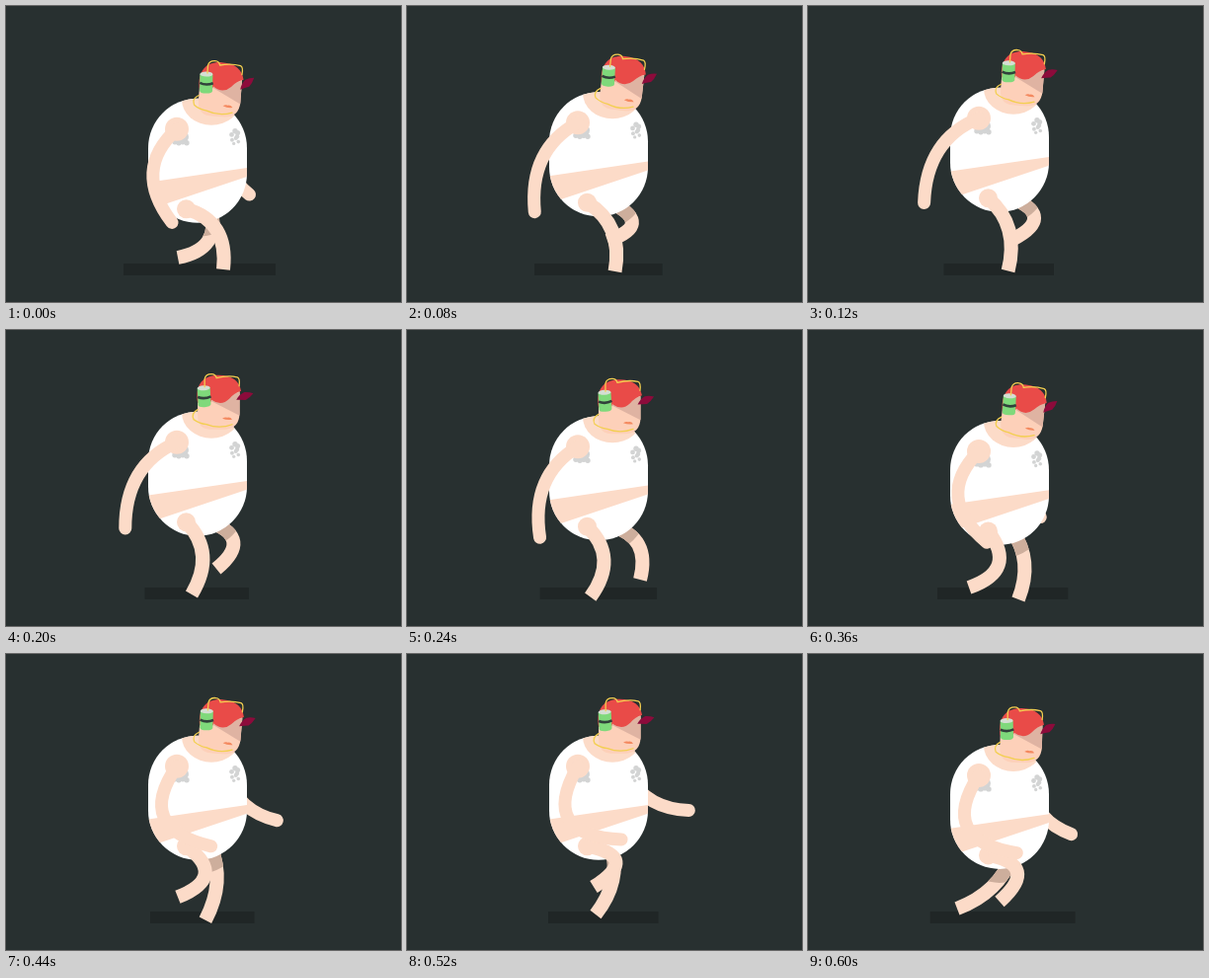
An HTML page with a canvas for the animation above (640 ms loop, 400 by 300 pixels).

```html
<!DOCTYPE html>
<html lang="en">
<head>
<meta charset="utf-8">
<title>Walk cycle</title>
<style>
html, body { margin: 0; height: 100%; overflow: hidden; background: #283030; }
canvas { display: block; }
</style>
</head>
<body>
<canvas id="stage" width="400" height="300"></canvas>
<script>
const ctx = document.getElementById('stage').getContext('2d');
const LOOP = 640, STEP = 40, RAD = Math.PI / 180;
const SKIN = '#fcdbc8', FACE = '#fdd0b9', SHADE = '#cdae9c', STAIN = '#d3d4d4', YELLOW = '#f3cf50';

// Key points by time in ms: foot positions, and the near arm's angle from straight down.
const nearStep = {
  0: [220, 267], 200: [188, 268], 280: [183, 272], 360: [163, 261], 520: [189, 236], 600: [194, 251]
};
const farStep = {
  0: [174, 255], 80: [203, 238], 200: [213, 242], 280: [254, 265],
  360: [213, 273], 520: [191, 264], 600: [151, 258]
};
const nearSwing = { 0: [-3], 150: [-35], 300: [-9], 460: [26], 600: [26] };

const wave = (t, period, peak = 0) => Math.cos(2 * Math.PI * (t - peak) / period);

// Smooth periodic interpolation through key points.
function along(keys, t) {
  const times = Object.keys(keys).map(Number), n = times.length;
  const at = k => times[(k + n) % n] + Math.floor(k / n) * LOOP;
  const val = k => keys[times[(k + n) % n]];
  const i = times.filter(s => s <= t).length - 1;
  const span = at(i + 1) - at(i), u = (t - at(i)) / span;
  return val(i).map((a, j) => {
    const b = val(i + 1)[j], d = b - a;
    const m0 = (b - val(i - 1)[j]) / (at(i + 1) - at(i - 1)) * span;
    const m1 = (val(i + 2)[j] - a) / (at(i + 2) - at(i)) * span;
    return a + u * (m0 + u * (3 * d - 2 * m0 - m1 + u * (m0 + m1 - 2 * d)));
  });
}

function fill(color, path) {
  ctx.fillStyle = color;
  ctx.fill(path instanceof Path2D ? path : new Path2D(path));
}

function line(color, width, path, cap = 'round') {
  ctx.strokeStyle = color;
  ctx.lineWidth = width;
  ctx.lineCap = cap;
  ctx.lineJoin = 'round';
  ctx.stroke(new Path2D(path));
}

function oval(color, x, y, rx, ry = rx) {
  ctx.fillStyle = color;
  ctx.beginPath();
  ctx.ellipse(x, y, rx, ry, 0, 0, 7);
  ctx.fill();
}

function clipped(path, paint) {
  ctx.save();
  ctx.clip(path);
  paint();
  ctx.restore();
}

function placed(x, y, degrees, paint) {
  ctx.save();
  ctx.translate(x, y);
  ctx.rotate(degrees * RAD);
  paint();
  ctx.restore();
}

// A curve from joint to tip that bulges forward by bend.
function limb(x, y, dx, dy, bend) {
  const k = bend / Math.hypot(dx, dy);
  return `M${x} ${y}q${dx * .46 + dy * k} ${dy * .46 - dx * k} ${dx} ${dy}`;
}

// The knee bends more as the foot comes closer to the hip.
function leg(x, y, [footX, footY], reach) {
  const dx = footX - x, dy = footY - y;
  const slack = .53 * (reach ** 2 - dx * dx - dy * dy);
  return limb(x, y, dx, dy, Math.sqrt(Math.max(slack, 18 ** 2)));
}

function drawArm(x, y, angle, length, bend) {
  const a = angle * RAD;
  line(SKIN, 13, limb(x, y, length * Math.sin(a), length * Math.cos(a), -bend));
}

function torso(bottom) {
  const p = new Path2D();
  p.roundRect(144, bottom - 126, 100, 126, 50);
  return p;
}

function drawTorso(base) {
  const shape = torso(base);
  fill('#fff', shape);
  clipped(shape, () => {
    ctx.translate(0, base);
    oval(SKIN, 208, -125, 30, 26);
    fill(SKIN, 'M140 -40.5L246 -56V-47.5L140 -12Z');
  });
  oval(STAIN, 177, base - 87, 8, 7);
  for (let i = 0; i < 4; i++) oval(STAIN, 171 + 4 * i, base - 82 + i % 2, 2.7);
  for (let i = 0; i < 8; i++) oval(STAIN, 232 + 3.5 * Math.sin(i * 2.3), base - 93 + i * 1.8, 2.7 - i * .15);
}

function drawVisor() {
  fill('#8c0b3b', 'M-2 6Q-1 0 3 -4Q7 -6 12 -6Q10 0 7 3Q3 4 -2 6Z');
}

function drawCan() {
  fill('#7fd97b', 'M-6.5 -9H6.5V8Q6 10.5 0 10.5Q-6 10.5 -6.5 8Z');
  oval('#d5ded3', 0, -9, 6.5, 2.5);
  line('#31413b', 2.6, 'M-6.5 0Q0 3 7 0', 'butt');
}

// Drawn around the neck.
function drawHead(flap) {
  fill(FACE, 'M-18 -36H24.5V-13Q24 2 10 3H-6Q-18 2 -18 -12Z');
  fill('#dfb3a2', 'M-5 -26L24.5 -11V-35Z');
  fill('#e94b48', 'M-18 -24C-21 -43 -12 -52 3 -52C17 -52 24 -46 26 -36Q19 -34 14 -28Q6 -20 -4 -27L-6 -22Z');
  placed(25, -32, flap, drawVisor);
  fill('#f4895f', 'M7 -8Q10 -10 12 -9Q15 -10 17 -7Q12 -6 7 -8Z');
  line(YELLOW, 1.3, 'M-18 -17Q-25 -13 -22 -7Q-17 -3 -9 -2Q4 3 17 -2');
  placed(-11.5, -30, -3, drawCan);
  line(YELLOW, 1.3, 'M-11 -40V-48Q-10 -53 -4 -53Q0 -53 1 -49Q12 -52 22 -50Q25 -49 24 -41');
}

function draw(t) {
  const half = LOOP / 2;
  const base = 213.3 + 6.5 * wave(t, half);
  const tilt = 3.2 + 3.4 * wave(t, half, 65);
  const flap = 7 - 13 * wave(t, half, 30);
  const hipY = base - 14, shoulderY = base - 95;

  ctx.fillStyle = '#283030';
  ctx.fillRect(0, 0, 400, 300);
  const spread = 62 + 11 * wave(t, half) + 4 * wave(t, LOOP);
  ctx.fillStyle = '#202626';
  ctx.fillRect(196 - 3 * wave(t, LOOP, 160) - spread, 261, 2 * spread, 12);

  const farAngle = 5 + 56 * wave(t, LOOP, 510);
  drawArm(225, base - 84, farAngle, 54 + farAngle / 4, 19);
  const farLeg = leg(207, hipY, along(farStep, t), 74);
  line(SKIN, 14, farLeg, 'butt');
  clipped(torso(base + 14), () => line(SHADE, 14, farLeg, 'butt'));

  drawTorso(base);
  oval(SKIN, 182.5, hipY, 9.5);
  line(SKIN, 14, leg(182.5, hipY, along(nearStep, t), 83), 'butt');
  oval(SKIN, 173, shoulderY, 12);
  const [angle] = along(nearSwing, t);
  drawArm(173, shoulderY, angle, 94 - angle / 4, Math.max(33, 46 + .8 * angle));
  placed(212, base - 111, tilt, () => drawHead(flap));
}

function tick() {
  draw(Math.floor(performance.now() % LOOP / STEP) * STEP);
  requestAnimationFrame(tick);
}
tick();
</script>
</body>
</html>
```
